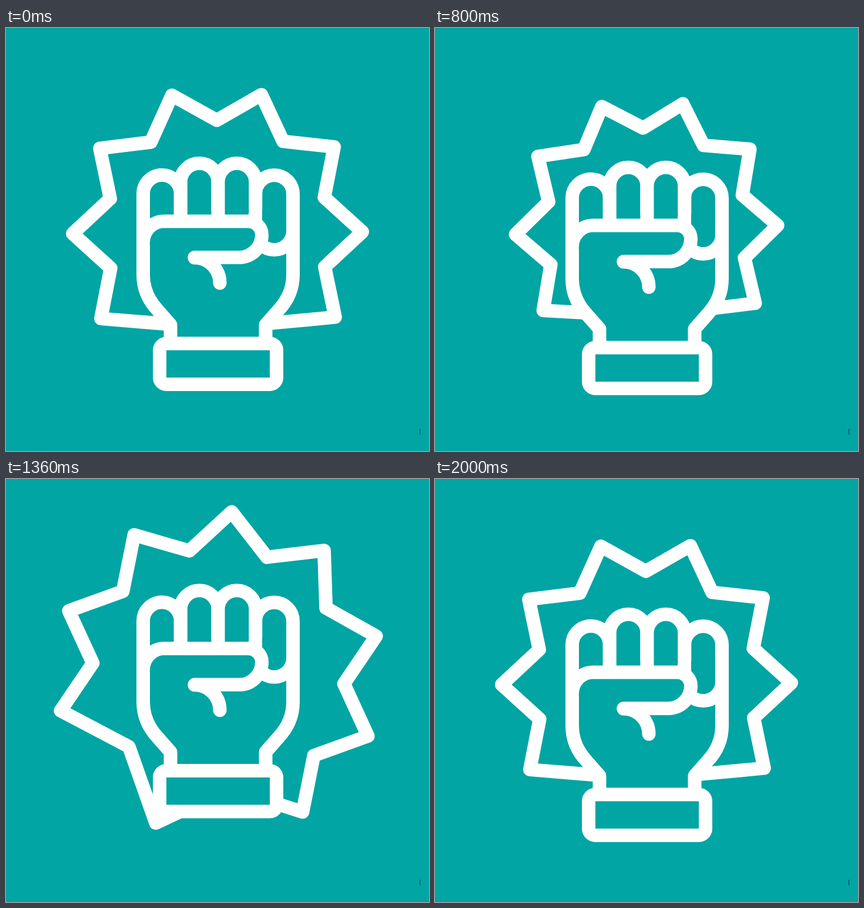
Write an HTML page that moves like this. It is 720x720 px and loops after 2520 ms.

```html
<!DOCTYPE html>
<html lang="en">
<head>
<meta charset="utf-8">
<title>Raised fist</title>
<style>
  html, body { margin: 0; width: 100%; height: 100%; overflow: hidden; background: #00a5a4; }
  svg { display: block; width: 100%; height: 100%; }
  .ink { fill: #00a5a4; stroke: #fff; stroke-width: 23; stroke-linecap: round; stroke-linejoin: round; }
</style>
</head>
<body>
<svg viewBox="0 0 720 720">
  <g class="ink">
    <polygon id="star"/>
    <g id="fist">
      <!-- palm -->
      <path d="M280 537V505L258 480C243 464 233.5 445 233.5 420V300H488.5V420C488.5 445 479 464 464 480L442 505V537"/>
      <!-- fingers -->
      <rect x="424.5" y="250.5" width="64" height="127" rx="32"/>
      <path id="finger" d="M233.5 349V282a31.875 31.75 0 0 1 63.75 0V329"/>
      <use href="#finger" x="63.75" y="-20"/>
      <use href="#finger" x="127.5" y="-20"/>
      <!-- thumb -->
      <path d="M233.5 365A35.5 36 0 0 1 269 329H412A23.5 23 0 0 1 435.5 352A38.5 38.5 0 0 1 397 390.5H321"/>
      <path fill="none" d="M321 391A43 43 0 0 1 364 434"/>
      <!-- cuff -->
      <rect x="261.5" y="537" width="199" height="69.5" rx="11.5"/>
    </g>
  </g>
  <path d="M705 682q-1.5 5 0 10" fill="none" stroke="#06302f"/>
</svg>
<script>
const LOOP = 2520, STEP = 40, RADIUS = 246.5;
const star = document.getElementById('star');
const fist = document.getElementById('fist');

const ease = u => (1 - Math.cos(Math.PI * Math.min(1, Math.max(0, u)))) / 2;

// Eases from pose to pose; each pose is [time, value]
const track = (...poses) => t => poses.slice(1).reduce((sum, [end, value], i) => {
  const [start, from] = poses[i];
  return sum + (value - from) * ease((t - start) / (end - start));
}, poses[0][1]);

// Wind up, punch, return, settle
const fistY = track([190, 0], [586, 58], [1082, -71.5], [1140, -71.5], [1620, 0]);
const starY = track([660, 0], [1180, -29.5], [1590, 0]);
const scale = track([160, 1], [600, .876], [715, .876], [1180, 1.242], [1600, .927], [2000, 1]);
const turn = track([160, -.35], [600, -10.8], [664, -10.8], [1150, 38], [1690, -8.5], [2000, -.35]);

// Corners as [degrees, radius]: ten-point spacing, with one wider tip at the bottom
const corners = [[62, .713], [90, 1], [118, .713]];
for (let a = 144; a <= 396; a += 18) corners.push([a, a % 36 ? .777 : 1]);

function draw(now) {
  const t = Math.floor((now + 1) % LOOP / STEP) * STEP;
  const y = starY(t), cx = 360 + y * y / 210, cy = 348.5 + y;
  const size = RADIUS * scale(t), angle = turn(t);
  star.setAttribute('points', corners.map(([a, r]) => {
    const rad = (a + angle) * Math.PI / 180;
    return [cx + size * r * Math.cos(rad), cy + size * r * Math.sin(rad)];
  }).join(' '));
  fist.setAttribute('transform', `translate(0 ${fistY(t)})`);
}

function frame() {
  draw(performance.now());
  requestAnimationFrame(frame);
}
frame();
</script>
</body>
</html>
```
